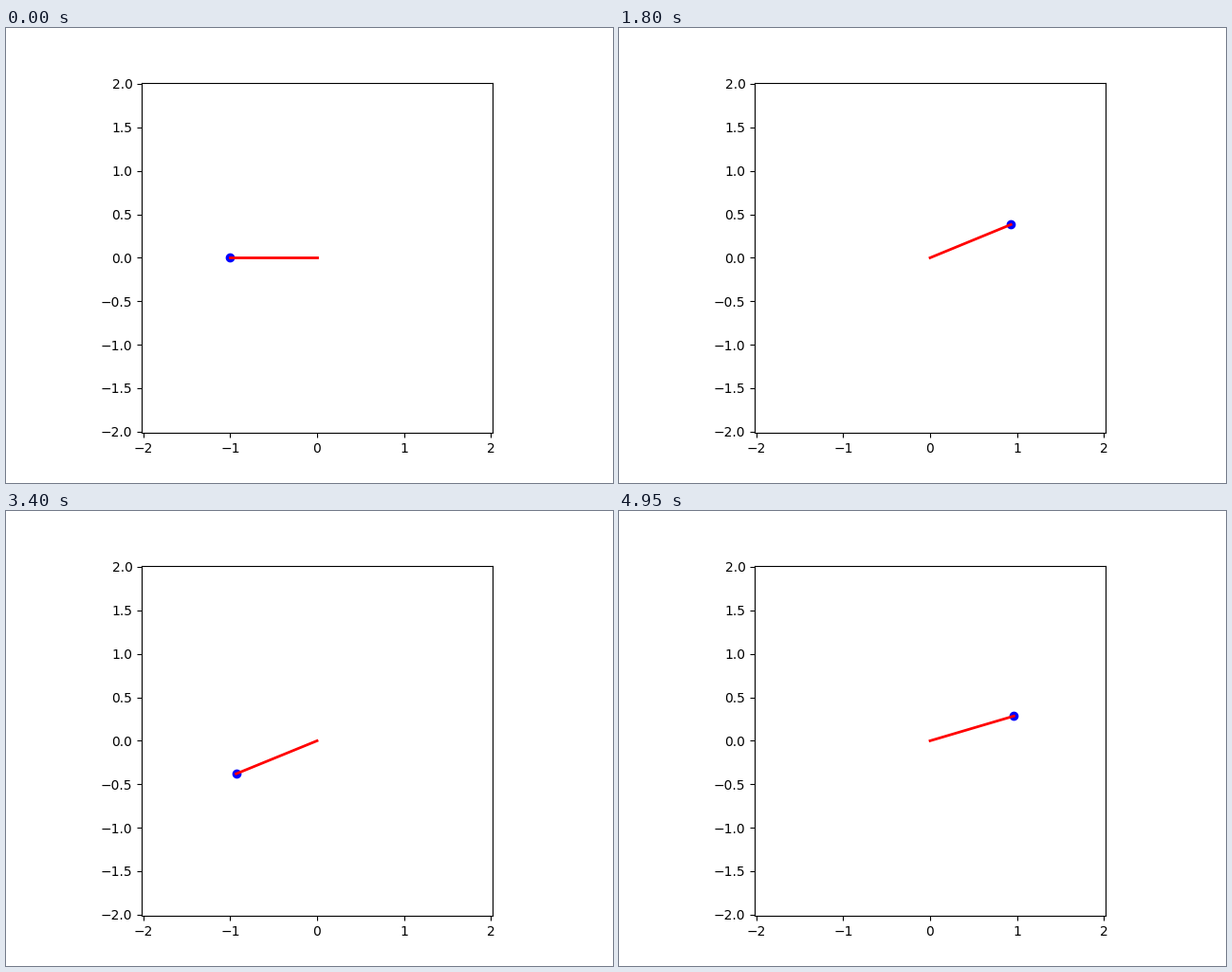
Recreate the animation shown at these times as a matplotlib script. Size 640 px wide and 480 px high, loop 5 s.

```python
import numpy as np
import matplotlib.pyplot as plt
from matplotlib.animation import FuncAnimation

FRAMES = 100
INTERVAL = 50      # ms
LENGTH = 1.005
STEP = 0.0981      # radians per frame
LIMIT = 2.015

fig, ax = plt.subplots(figsize=(6.4, 4.8), dpi=100)
ax.set_xlim(-LIMIT, LIMIT)
ax.set_ylim(-LIMIT, LIMIT)
ax.set_aspect("equal")
ax.set_xticks(np.arange(-2, 3))
ax.set_yticks(np.arange(-2, 2.5, 0.5))

bob, = ax.plot([], [], "bo")
rod, = ax.plot([], [], "r-", lw=2)


def update(frame):
    angle = np.pi + STEP * frame
    x, y = LENGTH * np.cos(angle), LENGTH * np.sin(angle)
    bob.set_data([x], [y])
    rod.set_data([0, x], [0, y])
    return bob, rod


anim = FuncAnimation(fig, update, frames=FRAMES, interval=INTERVAL,
                     repeat=True, repeat_delay=0)
plt.show()
```
